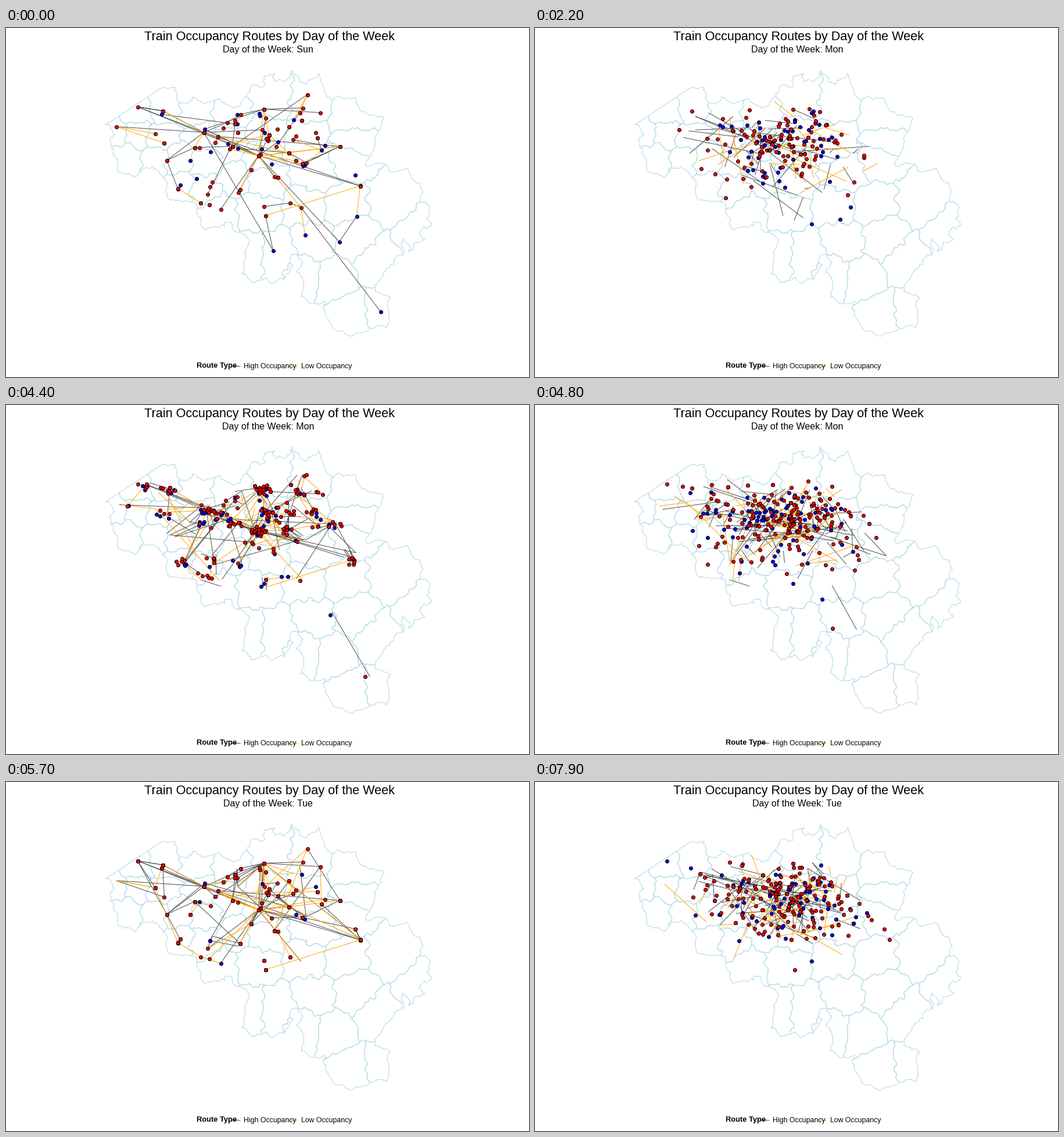
These frames come from a looping animation (900x600 px, 8 s). A matplotlib script:

```python
import numpy as np
import matplotlib.pyplot as plt
from matplotlib.animation import FuncAnimation
from matplotlib.collections import LineCollection
from matplotlib.path import Path

W, H, DPI = 900, 600, 100
PX = 72 / DPI
HOLD, STEPS = 15, 14
LEG = HOLD + STEPS
DAYS = ["Sun", "Mon", "Tue", "Wed"]
WATER, DARK, ORANGE = "#ADD8E6", "#4D4D4D", "#FFA500"
rng = np.random.default_rng(11)

# Corners of the country, clockwise; the first edge is the straight coast.
CORNERS = np.reshape([
    171, 166, 266, 103, 291, 102, 297, 126, 320, 118, 352, 126, 366, 121, 388, 135,
    405, 127, 420, 103, 440, 101, 444, 82, 462, 78, 463, 91, 478, 92, 490, 72,
    505, 88, 517, 96, 538, 78, 548, 106, 562, 125, 600, 119, 621, 147, 650, 155,
    637, 183, 620, 237, 689, 241, 700, 261, 712, 266, 713, 298, 726, 303, 731, 340,
    712, 352, 720, 363, 692, 384, 683, 362, 653, 414, 634, 452, 659, 492, 655, 515,
    596, 529, 549, 485, 550, 470, 508, 462, 512, 437, 500, 420, 498, 388, 488, 415,
    446, 429, 405, 421, 411, 390, 411, 355, 385, 333, 340, 346, 327, 300, 283, 296,
    268, 252, 250, 238, 222, 256, 192, 245, 180, 205, 171, 166], (-1, 2))

# District centres; borders run halfway between neighbours.
CENTRES = np.reshape([
    190, 180, 222, 148, 222, 180, 205, 225, 275, 135, 268, 190, 258, 222, 325, 145,
    335, 185, 385, 145, 385, 200, 345, 230, 295, 225, 300, 270, 340, 275, 365, 315,
    395, 258, 458, 120, 445, 185, 520, 125, 515, 195, 432, 222, 600, 155, 600, 195,
    535, 250, 590, 225, 440, 262, 430, 310, 420, 390, 465, 390, 520, 305, 530, 365,
    600, 360, 580, 302, 665, 295, 710, 350, 560, 430, 515, 425, 640, 400, 595, 495,
    645, 490], (-1, 2))

# Towns: x, y, traffic. Towns without traffic are served on Sunday only.
TOWNS = np.reshape([
    434, 219, 22, 340, 179, 10, 443, 139, 12, 486, 214, 6, 452, 183, 5, 609, 271, 4,
    574, 203, 4, 269, 142, 3, 446, 322, 2, 226, 135, 2, 276, 227, 2, 389, 203, 4,
    507, 308, 1, 189, 169, 1, 256, 181, 1, 380, 162, 1, 403, 148, 1, 505, 145, 2,
    518, 114, 1, 334, 300, 1, 295, 275, 1, 350, 272, 1, 364, 186, 2, 421, 243, 3,
    461, 255, 2, 402, 277, 1, 369, 311, 1, 516, 231, 1, 540, 145, 1, 498, 185, 1,
    535, 188, 1, 324, 205, 2, 573, 367, 0, 459, 382, 0, 644, 487, 0, 514, 355, 0,
    603, 323, 0], (-1, 3)).astype(float)

# Main routes as pairs of towns.
TRUNK_HIGH = [(9, 7), (9, 1), (9, 0), (7, 1), (1, 0), (1, 5), (0, 5), (13, 1),
              (22, 6), (10, 1), (10, 31), (1, 15), (15, 16), (16, 2), (27, 6),
              (27, 3), (2, 28), (25, 0), (26, 0)]
TRUNK_LOW = [(7, 1), (1, 0), (2, 0), (2, 4), (22, 3), (3, 6), (0, 3), (13, 14),
             (8, 5), (12, 0), (18, 17), (19, 20)]
SOUTH_HIGH = [(1, 33), (8, 33), (0, 32), (12, 34), (32, 36)]
SOUTH_LOW = [(12, 35), (5, 36)]
REMOTE = [(32, 34)]


def rough(pts):
    """Wrinkle a border by repeated midpoint displacement."""
    for _ in range(4):
        a, b = pts[:-1], pts[1:]
        normal = (b - a)[:, ::-1] * [-1, 1]
        out = np.empty((2 * len(pts) - 1, 2))
        out[::2] = pts
        out[1::2] = (a + b) / 2 + normal * rng.normal(0, .14, (len(a), 1))
        pts = out
    return pts


def ripple(x, y):
    """A sum of random waves, larger where they are longer."""
    total = 0
    for length in np.linspace(6, 30, 12):
        angle, phase = rng.uniform(0, 2 * np.pi, 2)
        along = x * np.cos(angle) + y * np.sin(angle)
        total = total + .05 * length * np.sin(2 * np.pi * along / length + phase)
    return total


def draw_map(ax):
    border = rough(CORNERS[1:])
    outline = np.vstack([CORNERS[:1], border])
    ax.add_collection(LineCollection([outline], colors=WATER, linewidths=PX, zorder=1))

    x, y = np.meshgrid(np.arange(170, 734, 2.), np.arange(70, 532, 2.))
    inside = Path(outline).contains_points(np.c_[x.ravel(), y.ravel()]).reshape(x.shape)
    wx, wy = x + ripple(x, y), y + ripple(x, y)
    dist = np.array([np.hypot(wx - cx, wy - cy) for cx, cy in CENTRES])
    first, second = np.partition(dist, 1, axis=0)[:2]
    for d in dist:
        gap = d - np.where(d == first, second, first)
        ax.contour(x, y, np.where(inside, gap, np.nan), levels=[0],
                   colors=WATER, linewidths=PX, zorder=1)


def satellites(n):
    """Small stations near a town, on its side towards the capital."""
    home = towns[rng.choice(np.flatnonzero(TOWNS[:, 2]), n)]
    return home + (towns[0] - home) * rng.uniform(0, .25, (n, 1)) + rng.normal(0, 9, (n, 2))


towns = TOWNS[:, :2]
busy = TOWNS[:, 2] > 0
red_stations = np.vstack([towns[busy], satellites(30)])
blue_stations = np.vstack([towns[~busy], satellites(24)])
stations = np.vstack([red_stations, blue_stations[(~busy).sum():]])
weight = np.full(len(stations), .8)
weight[:busy.sum()] = TOWNS[busy, 2]


def stops(n, pool):
    """Stations drawn by traffic from the first ones in the list."""
    p = weight[:pool] / weight[:pool].sum()
    return stations[rng.choice(pool, n, p=p)]


def links(n):
    """Each link joins a station with a near and busy one."""
    out = []
    for a in rng.choice(len(stations), n):
        dist = np.hypot(*(stations - stations[a]).T)
        pull = weight * np.exp(-dist / 35) * (dist > 8)
        out.append(stations[[a, rng.choice(len(stations), p=pull / pull.sum())]])
    return np.reshape(out, (-1, 2, 2))


def weekday(spare, remote=()):
    """Shuffled traffic, then remote trips, then spare items that pair with nothing."""
    every = len(stations)
    far = towns[np.array(remote, int).reshape(-1, 2)]
    plan = {}
    for key, trunk, n in (("high", TRUNK_HIGH, 62), ("low", TRUNK_LOW, 38)):
        moving = rng.permutation(np.concatenate([towns[np.array(trunk)], links(n)]))
        plan[key] = np.concatenate([moving, far if key == "high" else far[:0], links(spare // 3)])
    for key, n, end in (("blue", 100, 0), ("red", 180, 1)):
        tail = stations[rng.choice(every, spare)]
        plan[key] = np.concatenate([stops(n, every), far[:, end], tail])
    return plan


def sunday():
    reds = len(red_stations)
    return {
        "high": np.concatenate([towns[np.array(TRUNK_HIGH + SOUTH_HIGH)], links(26)]),
        "low": np.concatenate([towns[np.array(TRUNK_LOW + SOUTH_LOW)], links(14)]),
        "blue": np.concatenate([blue_stations, stops(36, reds)]),
        "red": np.concatenate([red_stations, stops(40, reds)])}


week = [sunday(), weekday(10, REMOTE), weekday(4), weekday(0)]


def between(a, b, t):
    """Paired items move; spare old ones wait, spare new ones appear at the end."""
    if t in (0, 1):
        return b if t else a
    n = min(len(a), len(b))
    return np.concatenate([a[:n] + (b[:n] - a[:n]) * t, a[n:]])


fig = plt.figure(figsize=(W / DPI, H / DPI), dpi=DPI, facecolor="white")
ax = fig.add_axes([0, 0, 1, 1])
draw_map(ax)
ax.set(xlim=(-.5, W - .5), ylim=(H - .5, -.5))
ax.axis("off")


def lines(segments, color, z):
    return ax.add_collection(LineCollection(
        segments, colors=color, linewidths=PX, zorder=z))


def dots(color, z):
    return ax.scatter([], [], s=(6 * PX) ** 2, c=color, edgecolors="black",
                      linewidths=PX, zorder=z)


def label(x, y, text, size, **kw):
    return ax.text(x, y, text, fontsize=size * PX, family="Liberation Sans",
                   color="black", va="baseline", zorder=6, **kw)


lines([[(387, 580), (402, 580)]], DARK, 2)
lines([[(485, 580), (500, 580)]], ORANGE, 2)
layers = {"high": lines([], DARK, 2), "low": lines([], ORANGE, 3),
          "blue": dots("#0000FF", 4), "red": dots("#FF0000", 5)}

label(237.5, 20.3, "Train Occupancy Routes by Day of the Week", 21.6)
subtitle = label(450.3, 41.2, "", 16, ha="center")
label(327.5, 583.3, "Route Type", 12.9, weight="bold")
label(408.5, 584.5, "High Occupancy", 12.2)
label(507.5, 584.5, "Low Occupancy", 12.2)


def draw(i):
    leg, k = divmod(i, LEG)
    t = max(0, k - HOLD + 1) / STEPS
    for key, layer in layers.items():
        place = between(week[leg][key], week[leg + 1][key], t)
        if key in ("high", "low"):
            layer.set_segments(place)
        else:
            layer.set_offsets(place)
    subtitle.set_text("Day of the Week: " + DAYS[leg + (t > .5)])
    return [*layers.values(), subtitle]


anim = FuncAnimation(fig, draw, frames=80, interval=100, repeat=True, repeat_delay=0)
plt.show()
```
